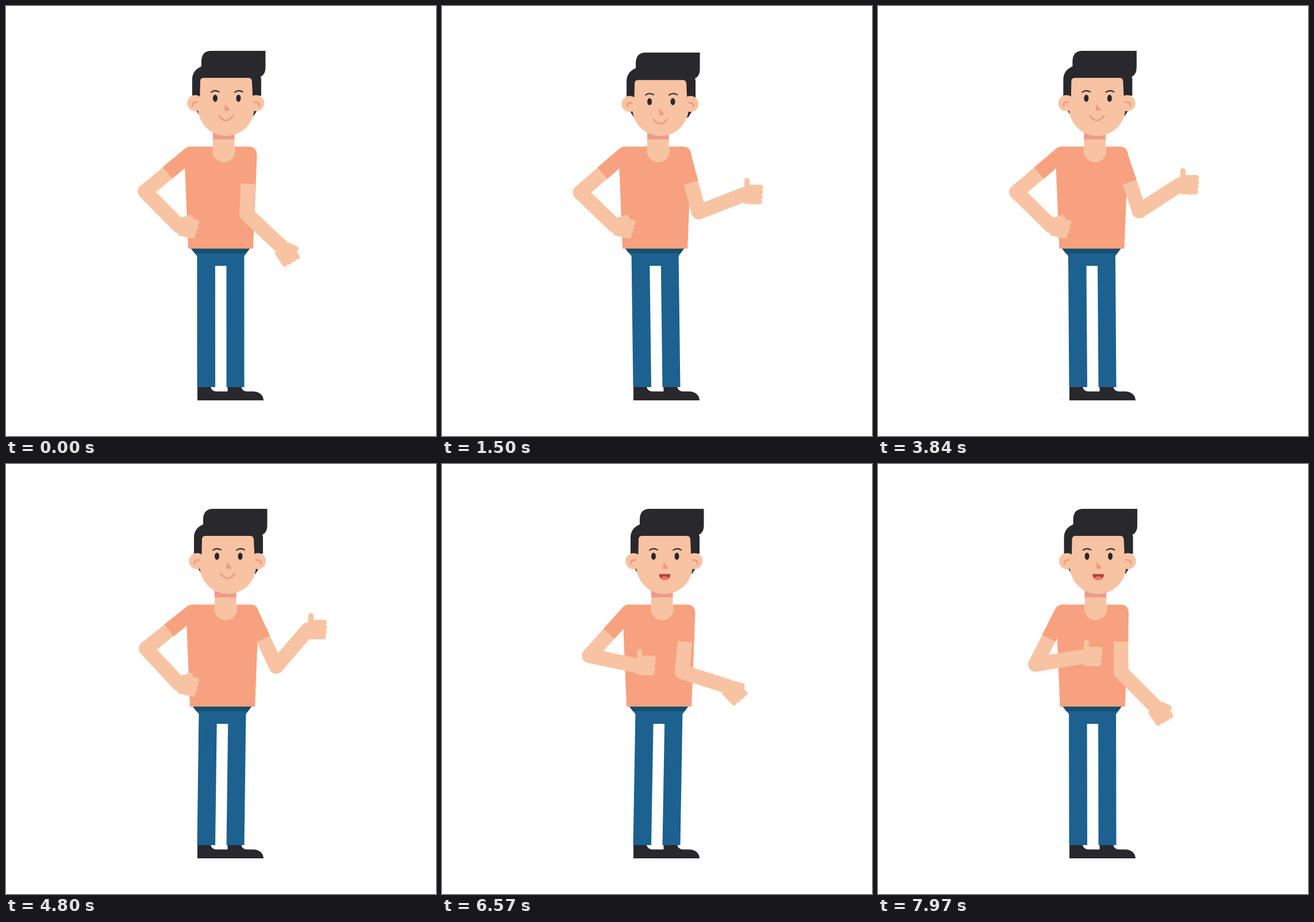
Recreate the animation shown at these times as an HTML page without scripts. Size 748 by 748 pixels, loop 8000 ms.

```html
<!DOCTYPE html>
<html lang="en">
<head>
<meta charset="utf-8">
<title>Thumbs up</title>
<style>
  /* sway, nod, hand position, hand angle, thumb fold */
  @property --s  { syntax: "<number>"; inherits: true; initial-value: 0; }
  @property --n  { syntax: "<number>"; inherits: true; initial-value: 0; }
  @property --hx { syntax: "<number>"; inherits: true; initial-value: 0; }
  @property --hy { syntax: "<number>"; inherits: true; initial-value: 0; }
  @property --ha { syntax: "<number>"; inherits: true; initial-value: 0; }
  @property --t  { syntax: "<number>"; inherits: true; initial-value: 0; }

  html, body { margin: 0; height: 100%; overflow: hidden; background: #fff; }
  svg {
    --ease: cubic-bezier(.33, 0, .67, 1);
    display: block; width: 100%; height: 100%;
    animation: sway 2s var(--ease) -440ms infinite, nod 8s var(--ease) infinite;
  }

  .skin { fill: #f8c3a2; }
  .shirt { fill: #f7a17f; }
  .dark { fill: #28282d; }
  .blush { fill: #ee9b8a; }
  .limb, .finger { stroke: #f8c3a2; stroke-linecap: round; }
  .limb { stroke-width: 25.5; }
  .finger { stroke-width: 9; }
  .line { fill: none; stroke: #ee9b8a; stroke-width: 3; stroke-linecap: round; }
  .brow { fill: none; stroke: #28282d; stroke-width: 2; stroke-linecap: round; }

  .body { transform: translateX(calc(var(--s) * 1px)); }
  .legs { transform: skewX(calc(var(--s) * -.246deg)); transform-origin: 0 663px; }
  .nod { transform: translateY(calc(var(--n) * var(--k) * 1px)); }

  /* two-bone arm: the shoulder follows the sway, the hand is placed freely */
  .arm {
    --dx: calc(var(--hx) - var(--sx) - var(--s));
    --dy: calc(var(--hy) - var(--sy));
    --bend: acos((var(--dx) * var(--dx) + var(--dy) * var(--dy)
      - var(--a) * var(--a) - var(--b) * var(--b)) / (2 * var(--a) * var(--b)));
    --lift: calc(atan2(var(--dy), var(--dx))
      + atan2(var(--b) * sin(var(--bend)), var(--a) + var(--b) * cos(var(--bend))));
  }
  .upper {
    transform: translate(calc((var(--sx) + var(--s)) * 1px), calc(var(--sy) * 1px))
      rotate(var(--lift));
  }
  .fore { transform: translateX(calc(var(--a) * 1px)) rotate(calc(-1 * var(--bend))); }
  .hand {
    transform: translate(calc(var(--hx) * 1px), calc(var(--hy) * 1px))
      rotate(calc(var(--ha) * 1deg));
  }
  .thumb { transform: rotate(calc(var(--t) * 1deg)); transform-origin: 5.5px -12px; }

  .left  { --sx: 320.5; --sy: 257.5; --a: 102; --b: 84; animation: left 8s var(--ease) infinite; }
  .right { --sx: 422.7; --sy: 258; --a: 104; --b: 84; animation: right 8s var(--ease) infinite; }
  .smile { animation: smile 8s step-end infinite; }
  .talk  { animation: talk 8s step-end infinite; }

  @keyframes sway { 0%, 100% { --s: -3; } 50% { --s: 4; } }
  @keyframes nod { 0%, 10.42%, 31.25%, 100% { --n: 0; } 20.83% { --n: 1; } }
  @keyframes left {
    0%, 72.92% { --hx: 301; --hy: 382.5; --ha: 12; }
    0%, 74% { --t: 58; }
    78%, 100% { --t: 0; }
    82%, 100% { --ha: 0; }
    87.9%, 100% { --hx: 357; --hy: 335; }
  }
  @keyframes right {
    0% { --hx: 480; --hy: 419.5; --ha: 56; }
    0%, 3% { --t: 58; }
    7%, 74% { --t: 0; }
    10.42%, 72.92% { --hx: 525; --hy: 328; --ha: 0; }
    31.25%, 52.08% { --hy: 328; animation-timing-function: cubic-bezier(.33, .1, .67, .9); }
    41.67%, 62.5% { --hy: 280; animation-timing-function: cubic-bezier(.33, .1, .67, .9); }
    78%, 100% { --t: 58; }
    82.13% { --ha: 46; }
    88.54%, 100% { --hx: 482; --hy: 421.5; --ha: 55; }
  }
  @keyframes smile { 0% { visibility: visible; } 72.92%, 100% { visibility: hidden; } }
  @keyframes talk { 0% { visibility: hidden; } 72.92%, 100% { visibility: visible; } }
</style>
</head>
<body>
<svg viewBox="0 0 748 748">
  <defs>
    <g id="fist">
      <rect class="skin" x="0.5" y="-17" width="28" height="33.5" rx="4"/>
      <path class="finger" d="M15 -12.5H29M15 -4.2H29M15 4.2H28.3M15 12.3H27.3"/>
      <path class="finger thumb" d="M5.5 -12V-24.5"/>
    </g>
    <path id="sleeve" class="shirt" d="M0 -13H51V13H0A13 13 0 0 1 0 -13Z"/>
    <clipPath id="lips"><path d="M373.5 191.5H393.5Q393 202 383.5 202Q374 202 373.5 191.5Z"/></clipPath>
  </defs>

  <path class="dark" d="M333 663H356Q358 670 365 670.5H385.5V662H409Q411 670 418 670.5H431Q447 672 448 686H333Z"/>

  <g class="legs">
    <path fill="#1c618f" d="M322 422H424L414.5 435V663H383.5V452H364V663H332.5V435Z"/>
    <path fill="#17506b" d="M322 422H424L418 430H328Z"/>
  </g>

  <g class="body">
    <path class="shirt" d="M323 244.5H422Q437 244.5 436.5 262L430 422H317L310.5 262Q310 244.5 323 244.5Z"/>
    <path class="skin" d="M360 225H397.5V244.5H399V252A19.8 19.8 0 0 1 359.4 252V244.5H360Z"/>
    <path class="blush" d="M360 215H397.5V232H360Z"/>

    <path class="dark nod" style="--k:3.4" d="M357 78H451.5V107Q451.5 119 443 123L444 126V156H437L438 180L431 191H337L330 180V156H324V128Q324 112 340 105V97Q340 78 357 78Z"/>
    <g class="nod" style="--k:1.6">
      <circle class="skin" cx="329.3" cy="169" r="14"/>
      <circle class="skin" cx="435.2" cy="169" r="14"/>
    </g>
    <path class="skin" d="M334 165V177A49 49 0 0 0 432 177V165Z"/>
    <path class="skin nod" style="--k:4.3" d="M337 175L338 131Q338 125 344 125H422Q427.5 125 428 131L430 175Z"/>
    <g class="nod line" style="--k:1.6">
      <path d="M325 173.5Q323 166.5 333 167"/>
      <path d="M440 173.5Q442 166.5 432 167"/>
    </g>

    <path class="brow nod" style="--k:5.5" d="M357 150Q363 145 371 149.5M398 150Q405 145 412 149.5"/>
    <g class="dark nod" style="--k:6.5">
      <ellipse cx="364" cy="160.5" rx="4" ry="6.2"/>
      <ellipse cx="404.5" cy="160.5" rx="4" ry="6.2"/>
    </g>
    <path class="blush nod" style="--k:8.5" d="M381 170L390 181Q386 183.5 380.5 182Z"/>
    <g class="nod" style="--k:6.5">
      <path class="line smile" d="M370.5 191Q382.5 207 395 191"/>
      <g class="talk" clip-path="url(#lips)">
        <path fill="#a9453f" d="M370 190H397V204H370Z"/>
        <ellipse fill="#ee7569" cx="383.5" cy="200.5" rx="8" ry="5"/>
      </g>
    </g>
  </g>

  <g class="arm left">
    <g class="upper">
      <path class="limb" d="M40 0H102"/>
      <path class="limb fore" d="M0 0H84"/>
      <use href="#sleeve"/>
    </g>
    <g class="hand"><use href="#fist"/></g>
  </g>

  <g class="arm right">
    <g class="upper">
      <path class="limb" d="M40 0H104"/>
      <path class="limb fore" d="M0 0H84"/>
      <use href="#sleeve"/>
    </g>
    <g class="hand"><use href="#fist"/></g>
  </g>
</svg>
</body>
</html>
```
